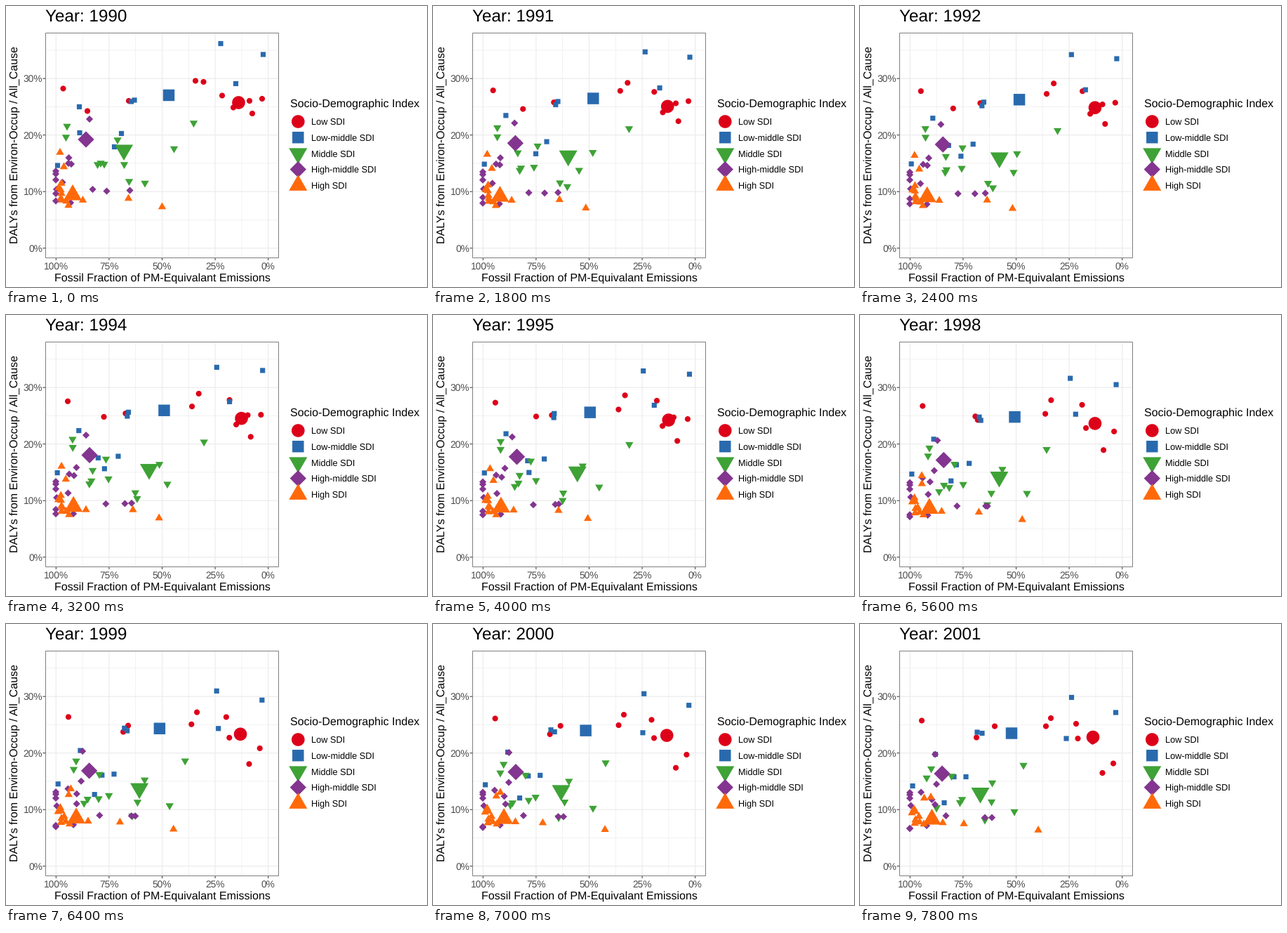
A matplotlib script that plays this animation: 600 px wide and 400 px high, repeating every 8 s.

```python
import numpy as np
import matplotlib.pyplot as plt
from matplotlib.animation import FuncAnimation
from matplotlib.patches import Polygon, Rectangle

W, H, DPI = 600, 400, 100
FRAMES, INTERVAL = 40, 200
BIG, SMALL = 9.3, 4.05

plt.rcParams["font.family"] = "Liberation Sans"
plt.rcParams["text.hinting"] = "none"
fig = plt.figure(figsize=(W / DPI, H / DPI), dpi=DPI, facecolor="white")
ax = fig.add_axes([0, 0, 1, 1])
ax.set_xlim(0, W)
ax.set_ylim(H, 0)
ax.axis("off")


def ngon(n, start, r):
    a = np.radians(start) + 2 * np.pi * np.arange(n) / n
    return r * np.column_stack([np.cos(a), np.sin(a)])


SHAPES = {
    "Low SDI": (ngon(48, 0, 1.0), "#dd0019"),
    "Low-middle SDI": (ngon(4, 45, 1.253), "#296aae"),
    "Middle SDI": (ngon(3, 90, 1.62), "#3ea236"),
    "High-middle SDI": (ngon(4, 0, 1.253), "#83358f"),
    "High SDI": (ngon(3, -90, 1.62), "#ff690a"),
}


def px(size):
    return size * 72 / DPI


def text(x, y, s, size, color="black", **kw):
    return ax.text(x, y, s, fontsize=px(size), color=color, va="baseline", **kw)


def line(xs, ys, color, width):
    ax.plot(xs, ys, color=color, lw=px(width), solid_capstyle="butt",
            snap=False, zorder=1)


def mark(group, x, y, r, z):
    shape, color = SHAPES[group]
    p = Polygon(shape * r + (x, y), closed=True, fc=color, lw=0,
                snap=False, zorder=z)
    return ax.add_patch(p)


# Panel, grid and axes
X0, X1, Y0, Y1 = 56, 388, 38, 358
for i in range(9):
    x = 71.3 + 37.8 * i
    line([x, x], [Y0, Y1], "#ebebeb", 0.6 if i % 2 else 1.1)
    if i % 2 == 0:
        line([x, x], [Y1, Y1 + 4], "#333333", 1)
        text(x, 375, f"{100 - 25 * i // 2}%", 13.8, "#4d4d4d", ha="center")
for i in range(8):
    y = 344.7 - 40.25 * i
    line([X0, X1], [y, y], "#ebebeb", 0.6 if i % 2 else 1.1)
    if i % 2 == 0:
        line([X0 - 3.5, X0], [y, y], "#333333", 1)
        text(52, y + 5, f"{5 * i}%", 13.8, "#4d4d4d", ha="right")
ax.add_patch(Rectangle((X0, Y0), X1 - X0, Y1 - Y0, fill=False,
                       ec="#7f7f7f", lw=px(1), zorder=9))

title = text(55.5, 23, "", 24.3)
text(222.6, 392, "Fossil Fraction of PM-Equivalant Emissions", 16, ha="center")
text(17, 198, "DALYs from Environ-Occup / All_Cause", 16, rotation=90,
     ha="center", rotation_mode="anchor")

# Legend
text(404.8, 144, "Socio-Demographic Index", 16)
for i, name in enumerate(SHAPES):
    y = 164.5 + 22.7 * i
    mark(name, 416.3, y, BIG, 5)
    text(434.7, y + 4.6, name, 12.8)

movers = []


def add(group, *paths):
    """Each path: start x, y, end x, y, then optional sideways and downward bow.

    The first path belongs to the large group mean.
    """
    z = 3 + list(SHAPES).index(group) / 10
    for i, (x0, y0, x1, y1, *bow) in enumerate(paths):
        r = SMALL if i else BIG
        patch = mark(group, x0, y0, r, z if i else z + 1)
        bow = np.array((bow + [0, 0])[:2])
        movers.append((patch, SHAPES[group][0] * r,
                       np.array([x0, y0]), np.array([x1, y1]), bow))


add("Low SDI",
    (331.5, 137.5, 332, 161, 4),
    (81.5, 117.5, 88, 137.5, 4, -3), (116, 149.5, 192, 145.5, -8, -3),
    (175, 135, 166, 161.5, -1, -6), (270, 106.5, 265, 145.5, -3, 8),
    (281.5, 108, 272, 134, -3, -7), (308, 127.5, 308, 142, 11, -13),
    (324, 144.5, 310.5, 163, 10, 4), (347, 135, 331.5, 167.5, 4, -6),
    (351, 153, 345.5, 212, 0, -4), (365, 132, 361, 198.5, 0, -18))

add("Low-middle SDI",
    (232, 127, 216, 155.5, 0, -3),
    (306, 53.5, 301.5, 104.5, -4), (366.5, 69, 364.5, 126, 0, -14),
    (327.5, 110.5, 294, 163, 5, -9), (183, 134, 167, 154, -2, -4),
    (178.5, 136, 174, 155.5, -4), (104.5, 143.5, 107.5, 185.5, -2, 4),
    (105, 180.5, 134, 217.5, 15, 8), (164.5, 181.5, 151, 217.5, 1, 5),
    (154.5, 200.5, 120, 254.5, 0, -4), (73.5, 227, 75, 230.5, -1, -4))

add("Middle SDI",
    (168, 205, 171.5, 240.5, 36),
    (87, 171, 101.5, 206, 2, -9), (85.5, 186.5, 95, 219, 6, -12),
    (159, 190.5, 130.5, 216.5, -5, 4), (267.5, 166.5, 233, 201, 30),
    (239.5, 203, 188.5, 226), (130.5, 225.5, 109, 261.5, -3),
    (135, 223.5, 142.5, 254, -17), (140, 225, 145.5, 249.5, 4, -2),
    (168.5, 225.5, 220, 267, 42, -2), (175.5, 249.5, 187.5, 253, 4, 2),
    (198, 252, 178, 279, -3, -2), (114, 193, 109, 261.5, 12))

add("High-middle SDI",
    (114, 190, 117, 213, 4),
    (119, 161, 107, 185.5), (89.5, 216, 109, 228, 3, -4),
    (89, 224, 87, 239.5, 2, -4), (93, 225, 102.5, 250, 0, -7),
    (71, 235, 71, 240), (71, 239, 71, 243), (71, 247.5, 71, 248),
    (71, 267, 71, 291), (71, 277.5, 71, 291), (72, 261, 72.5, 258.5),
    (80.5, 251, 107, 257, -3), (92, 280, 95, 287, 3),
    (123.5, 261, 122.5, 273, 20, 3), (143.5, 263.5, 188, 275.5, 8),
    (176.5, 262.5, 178, 275.5, 2))

add("High SDI",
    (95, 269, 102.5, 278, -2),
    (77, 208.5, 101, 246.5, -8, -9), (82.5, 229, 91.5, 248, -1, -3),
    (79, 252.5, 77, 263.5), (75, 259, 74, 269), (78, 262, 79, 267),
    (79, 267, 79, 279), (78, 274, 84, 274), (80, 276.5, 78, 284),
    (86, 278, 85, 282), (89, 284, 91, 285), (109.5, 276.5, 118, 283, 1, -2),
    (174.5, 274, 148, 284.5, 18, -1), (222.5, 286, 254, 293.5, -18))


def draw(n):
    title.set_text(f"Year: {1990 + max(0, (n - 4) // 3)}")
    t = n / (FRAMES - 1)
    for patch, shape, start, end, bow in movers:
        patch.set_xy(shape + start + (end - start) * t + bow * np.sin(np.pi * t))
    return []


anim = FuncAnimation(fig, draw, frames=FRAMES, interval=INTERVAL,
                     repeat=True, repeat_delay=0)
plt.show()
```
